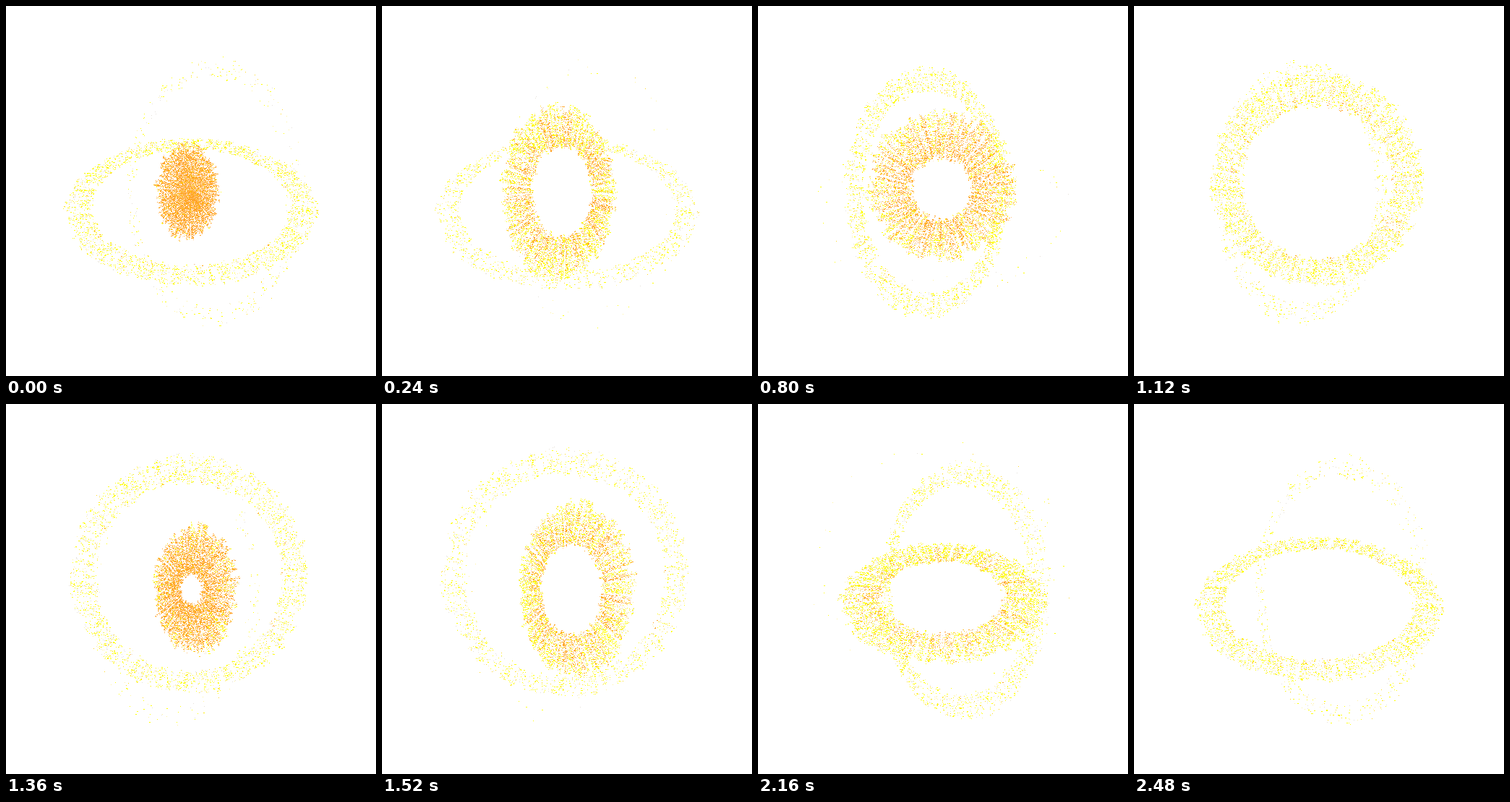
An HTML page with a canvas for the animation above (2.56 s loop, 512 px wide and 512 px high).

```html
<!DOCTYPE html>
<html lang="en">
<head>
<meta charset="utf-8">
<title>Fireworks</title>
<style>
  html, body { margin: 0; width: 100%; height: 100%; overflow: hidden; background: #fff; }
  canvas { display: block; width: 100%; height: 100%; }
</style>
</head>
<body>
<canvas id="stage" width="512" height="512"></canvas>
<script>
const LOOP = 2560, STEP = 80, LIFE = 1700;
const CX = 254, CY = 256, SPOKES = 150, DOTS = 80;
const ctx = document.getElementById('stage').getContext('2d');

// Final radii and centre drift of each burst; pace sets how fast it opens.
const bursts = [
  { start: 0,    rx: 126, ry: 194, dx: -26, dy: 2,   pace: .0024 },
  { start: 640,  rx: 186, ry: 188, dx: -2,  dy: -28, pace: .0024 },
  { start: 1280, rx: 128, ry: 195, dx: 38,  dy: 2,   pace: .0024 },
  { start: 1840, rx: 188, ry: 110, dx: 2,   dy: 33,  pace: .0031 }
];

let seed = 7;
function random() {
  seed = (seed + 0x6D2B79F5) | 0;
  let n = Math.imul(seed ^ (seed >>> 15), seed | 1);
  n ^= n + Math.imul(n ^ (n >>> 7), n | 61);
  return ((n ^ (n >>> 14)) >>> 0) / 4294967296;
}

// Dots lie along radial spokes, so neighbours share direction, reach and heat.
function makeDots() {
  const dots = [];
  for (let s = 0; s < SPOKES; s++) {
    const angle = (s + random()) / SPOKES * Math.PI * 2;
    const near = random() * .15, far = .82 + random() * .24;
    const heat = random(), stamina = random();
    for (let d = 0; d < DOTS; d++) {
      const a = angle + (random() - .5) * .05;
      const depth = near + (far - near) * random();
      dots.push({
        cos: Math.cos(a), sin: Math.sin(a), depth,
        heat: heat * .5 + random() * .35 + depth * depth * .3,
        fade: random() * (.8 + stamina * .4),
        tone: random()
      });
    }
  }
  return dots;
}
bursts.forEach(b => { b.dots = makeDots(); });

function colour({ tone }, glowing) {
  if (glowing) {
    return tone < .45 ? '#ffa52a' : tone < .75 ? '#ffc27a' : tone < .88 ? '#ffe4c4' : '#ffc800';
  }
  return tone < .5 ? '#ffff00' : tone < .62 ? '#ffd820' : tone < .85 ? '#fff3a0' : '#e4e0d8';
}

function drawBurst(b, time) {
  const age = (time - b.start + LOOP) % LOOP;
  if (age >= LIFE) return;
  const grow = 1 - .65 * Math.exp(-b.pace * age);
  const hole = .83 * (1 - Math.exp(-.0036 * age));
  const keep = (1 - age / LIFE) ** 2.5;
  const hot = .95 * Math.exp(-age / 350);
  for (const dot of b.dots) {
    if (dot.fade > keep) continue;
    const r = hole + (1 - hole) * dot.depth;
    const x = CX + r * (dot.cos * b.rx * grow + b.dx * grow * grow);
    const y = CY + r * (dot.sin * b.ry * grow + b.dy * grow * grow);
    ctx.fillStyle = colour(dot, dot.heat < hot);
    ctx.fillRect(Math.round(x), Math.round(y), dot.tone < .15 ? 2 : 1, 1);
  }
}

function frame() {
  const time = Math.floor(performance.now() % LOOP / STEP) * STEP;
  ctx.fillStyle = '#fff';
  ctx.fillRect(0, 0, 512, 512);
  bursts.forEach(b => drawBurst(b, time));
  requestAnimationFrame(frame);
}
frame();
</script>
</body>
</html>
```
